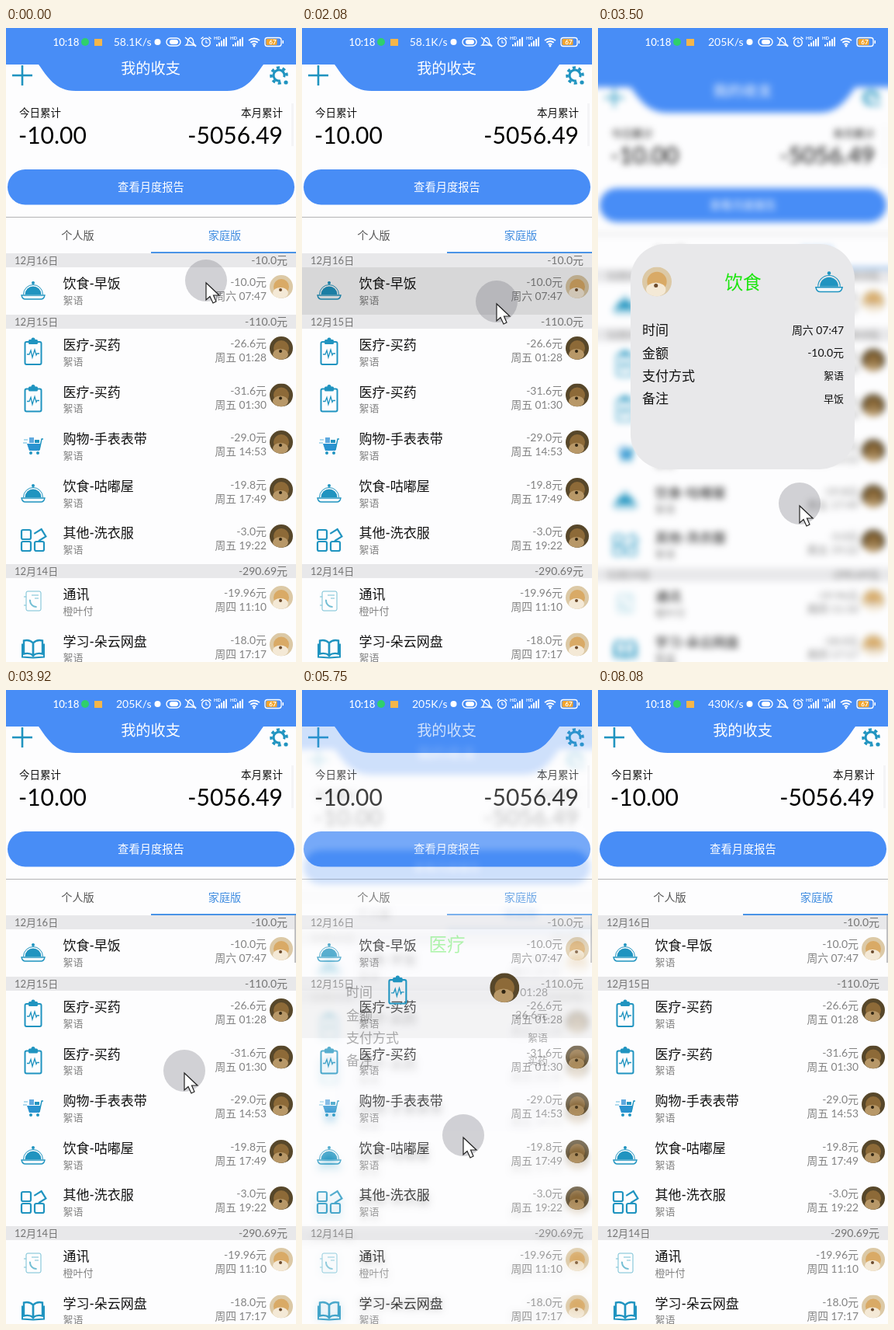
An HTML page with a canvas for the animation above (8160 ms loop, 374 by 816 pixels).

```html
<!DOCTYPE html>
<html lang="zh-CN">
<head>
<meta charset="utf-8">
<title>我的收支</title>
<style>
html, body { margin: 0; width: 100%; height: 100%; overflow: hidden; background: #fdfdfe; }
canvas { display: block; width: 374px; height: 816px; }
</style>
</head>
<body>
<canvas id="stage" width="374" height="816"></canvas>
<script>
const W = 374, H = 816, LOOP = 8160;
const BLUE = '#488df6', TEAL = '#2094c0', PAPER = '#fdfdfe';
const BAND = '#e8e8ea', INK = '#111', GRAY = '#828282';
const FONT = 'Lato, "Noto Sans CJK SC", "Noto Sans CJK", sans-serif';

const stage = document.getElementById('stage').getContext('2d');
let g = stage;

// Drawing helpers
function text(s, x, cy, size, color, align = 'left', weight = 400) {
  g.font = `${weight} ${size}px ${FONT}`;
  g.fillStyle = color;
  g.textAlign = align;
  g.textBaseline = 'alphabetic';
  g.fillText(s, x, cy + size * 0.37);
}
function rect(x, y, w, h, color) {
  g.fillStyle = color;
  g.fillRect(x, y, w, h);
}
function round(x, y, w, h, r, color) {
  g.beginPath();
  g.roundRect(x, y, w, h, r);
  g.fillStyle = color;
  g.fill();
}
function roundLine(x, y, w, h, r, color, lw) {
  g.beginPath();
  g.roundRect(x, y, w, h, r);
  g.strokeStyle = color;
  g.lineWidth = lw;
  g.stroke();
}
function disc(x, y, r, color) {
  g.beginPath();
  g.arc(x, y, r, 0, 7);
  g.fillStyle = color;
  g.fill();
}
function line(points, color, lw) {
  g.beginPath();
  points.forEach(([x, y]) => g.lineTo(x, y));
  g.strokeStyle = color;
  g.lineWidth = lw;
  g.stroke();
}
function arc(x, y, r, a, b, color, lw) {
  g.beginPath();
  g.arc(x, y, r, a, b);
  g.strokeStyle = color;
  g.lineWidth = lw;
  g.stroke();
}
function at(x, y, scale, draw) {
  g.save();
  g.translate(x, y);
  g.scale(scale, scale);
  draw();
  g.restore();
}

// Category icons, centred on the origin
const icons = {
  dish() {
    g.beginPath();
    g.arc(0, 5, 10.5, Math.PI, 0);
    g.closePath();
    g.fillStyle = TEAL;
    g.fill();
    arc(0, 5, 12.5, Math.PI, 0, TEAL, 1);
    disc(0, -10, 2, TEAL);
    g.beginPath();
    g.moveTo(-15, 6);
    g.lineTo(15, 6);
    g.quadraticCurveTo(14, 11, 10, 11);
    g.lineTo(-10, 11);
    g.quadraticCurveTo(-14, 11, -15, 6);
    g.closePath();
    g.fillStyle = '#f2f8fb';
    g.fill();
    g.strokeStyle = TEAL;
    g.lineWidth = 1.3;
    g.stroke();
  },
  clip() {
    roundLine(-10.5, -13, 21, 29, 2, TEAL, 2);
    round(-6, -16, 12, 6, 1.5, TEAL);
    disc(0, -16, 2.5, TEAL);
    line([[-8, 3], [-5, 3], [-3, -2], [-1, 7], [2, -3], [4, 4], [5, 2], [8, 2]], TEAL, 1.3);
  },
  cart() {
    line([[-12, -8], [-7, -8]], '#7cc4e4', 1.2);
    line([[-13, -4], [-8, -4]], '#7cc4e4', 1.2);
    rect(-5, -11, 6, 7, '#5fa9df');
    rect(2, -8, 6, 4, TEAL);
    g.beginPath();
    g.moveTo(-8, -3);
    g.lineTo(10, -3);
    g.lineTo(8, 6);
    g.lineTo(-5, 6);
    g.closePath();
    g.fillStyle = '#2a93d0';
    g.fill();
    line([[8, 5], [11, -9], [13, -9]], TEAL, 1.5);
    disc(-3, 9, 2, TEAL);
    disc(6, 9, 2, TEAL);
  },
  other() {
    for (const [x, y] of [[-15, -13], [-15, 2], [2, 2]]) roundLine(x, y, 12, 12, 2, TEAL, 2.2);
    at(9, -7, 1, () => {
      g.rotate(-0.55);
      line([[-6, -5], [5, -5], [5, 6], [-6, 6]], TEAL, 2.2);
    });
  },
  phone() {
    const c = '#74bfd4';
    roundLine(-9, -13, 19, 25, 2, c, 1);
    line([[-2, -8], [7, -8]], c, 1);
    line([[2, -4], [7, -4]], c, 1);
    arc(4, -1, 8, 1.5, 3.3, c, 2);
    line([[-12, -6], [-9, -6]], c, 1);
    line([[-12, 5], [-9, 5]], c, 1);
  },
  book() {
    for (const k of [-1, 1]) {
      g.beginPath();
      g.moveTo(0, -7);
      g.quadraticCurveTo(k * 5, -12, k * 12, -10);
      g.lineTo(k * 12, 7);
      g.quadraticCurveTo(k * 5, 5, 0, 9);
      g.closePath();
      g.strokeStyle = TEAL;
      g.lineWidth = 2.4;
      g.stroke();
      line([[k * 14, -6], [k * 14, 11], [0, 12]], TEAL, 2);
    }
  }
};

function avatar(x, y, r, dark) {
  const [back, coat, face, mark] = dark
    ? ['#57472a', '#8d6a38', '#b89868', '#302512']
    : ['#dcc9a6', '#d9aa66', '#f4e9d6', '#6b4a2c'];
  g.save();
  g.beginPath();
  g.arc(x, y, r, 0, 7);
  g.clip();
  at(x, y, r / 15, () => {
    rect(-15, -15, 30, 30, back);
    disc(0, 0, 10, coat);
    g.beginPath();
    g.ellipse(-1, 8, 10, 7, 0, 0, 7);
    g.fillStyle = face;
    g.fill();
    disc(-1, 4, 2, mark);
  });
  g.restore();
}

// Screen content
const bands = [
  [290, '12月16日', '-10.0元'],
  [369, '12月15日', '-110.0元'],
  [690, '12月14日', '-290.69元']
];
const rows = [
  [329, 'dish', '饮食-早饭', '絮语', '-10.0元', '周六 07:47', 0],
  [408, 'clip', '医疗-买药', '絮语', '-26.6元', '周五 01:28', 1],
  [468.5, 'clip', '医疗-买药', '絮语', '-31.6元', '周五 01:30', 1],
  [529, 'cart', '购物-手表表带', '絮语', '-29.0元', '周五 14:53', 1],
  [590, 'dish', '饮食-咕嘟屋', '絮语', '-19.8元', '周五 17:49', 1],
  [650, 'other', '其他-洗衣服', '絮语', '-3.0元', '周五 19:22', 1],
  [729, 'phone', '通讯', '橙叶付', '-19.96元', '周四 11:10', 0],
  [789.5, 'book', '学习-朵云网盘', '絮语', '-18.0元', '周四 17:17', 0]
];

function header() {
  g.beginPath();
  g.moveTo(0, 0);
  g.lineTo(W, 0);
  g.lineTo(W, 47);
  g.lineTo(332, 47);
  g.bezierCurveTo(321, 62, 311, 81, 285, 81);
  g.lineTo(90, 81);
  g.bezierCurveTo(63, 81, 53, 62, 42, 47);
  g.lineTo(0, 47);
  g.fillStyle = BLUE;
  g.fill();
  text('我的收支', 186.5, 52, 19.2, '#fff', 'center');
  line([[8, 61], [34, 61]], TEAL, 2.6);
  line([[21, 48], [21, 74]], TEAL, 2.6);
  arc(352, 61, 7, 1.3, 6.6, TEAL, 3);
  g.setLineDash([4, 3.7]);
  arc(352, 61, 10, 1.3, 6.6, TEAL, 3.5);
  g.setLineDash([]);
  disc(361, 70, 2.6, TEAL);
}

function screen(hidden) {
  rect(0, 0, W, H, PAPER);
  header();
  text('今日累计', 17, 109, 13.5, INK, 'left', 500);
  text('本月累计', 357, 109, 13.5, INK, 'right', 500);
  text('-10.00', 16, 138, 30, '#000');
  text('-5056.49', 357, 138, 30, '#000', 'right');
  rect(368, 97, 3, 55, '#f4f4f6');
  round(2, 182, 370, 45.5, 22.7, BLUE);
  text('查看月度报告', 187, 205, 14.3, '#fff', 'center', 500);
  rect(0, 243, W, 1, '#b4b4b4');
  text('个人版', 92.5, 266.5, 14.2, '#555', 'center');
  text('家庭版', 282, 266.5, 14.2, '#3f8ce0', 'center');
  rect(187, 288, 187, 2, '#4a94e6');
  for (const [y, day, sum] of bands) {
    rect(0, y, W, 18, BAND);
    text(day, 11, y + 9, 13, '#747474');
    text(sum, 363, y + 9, 14, '#747474', 'right');
  }
  rows.forEach(([y, icon, name, via, sum, when, dark], i) => {
    if (i !== hidden) {
      at(35, y + 9, 1, icons[icon]);
      avatar(355, y + 4, 15, dark);
    }
    text(name, 73.5, y, 17, INK, 'left', 500);
    text(via, 73.5, y + 21, 13, GRAY);
    text(sum, 336, y - 2, 14, GRAY, 'right');
    text(when, 336, y + 16, 13.8, GRAY, 'right');
  });
}

function statusBar(t) {
  const speed = t < 3170 ? '58.1K/s' : t < 7200 ? '205K/s' : '430K/s';
  const c = '#fff';
  text('10:18', 60.5, 18, 13.2, c, 'left', 500);
  disc(102, 18, 5, '#2fd06c');
  rect(114, 14, 10, 9, '#f5b64a');
  text(speed, 187.5, 18, 14, c, 'right');
  disc(195.5, 18, 4, c);
  roundLine(207, 13, 18, 10, 5, c, 1.4);
  round(211, 15, 11, 6, 3, c);
  g.beginPath();
  g.moveTo(232, 22);
  g.quadraticCurveTo(235, 20, 234.5, 16);
  g.quadraticCurveTo(238, 9, 241.5, 16);
  g.quadraticCurveTo(241, 20, 244, 22);
  g.closePath();
  g.strokeStyle = c;
  g.lineWidth = 1.3;
  g.stroke();
  line([[231, 12], [245, 24]], c, 1.3);
  arc(258, 18.5, 5.3, 0, 7, c, 1.4);
  line([[258, 15.5], [258, 19], [260.5, 19]], c, 1.2);
  line([[251.5, 14], [254.5, 11.5]], c, 1.4);
  line([[264.5, 14], [261.5, 11.5]], c, 1.4);
  for (const x of [268, 289]) {
    text('HD', x, 12.5, 6, c, 'left', 700);
    for (let i = 0; i < 5; i++) rect(x + 3 + i * 3, 21 - i * 2.3, 2, 2.5 + i * 2.3, c);
  }
  for (const r of [3.5, 7, 10.5]) arc(320, 24, r, -2.3, -0.84, c, 1.8);
  disc(320, 23, 1.5, c);
  roundLine(334, 12.5, 21, 11, 3, c, 1.3);
  round(335.5, 14, 14, 8, 1.5, '#f3a52c');
  rect(356.5, 16, 1.5, 4, c);
  text('67', 344, 18, 8, c, 'center', 700);
}

// Soft copy of the screen, fitted below the status bar
function softCopy() {
  const PAD = 20, TOP = 31;
  const make = (w, h) => {
    const c = document.createElement('canvas');
    c.width = w;
    c.height = h;
    g = c.getContext('2d');
    return c;
  };
  const sharp = make(W, H);
  screen(-1);
  const wide = make(W + PAD * 2, H + PAD);
  g.drawImage(sharp, 0, 0, 1, H, 0, 0, PAD, H);
  g.drawImage(sharp, W - 1, 0, 1, H, W + PAD, 0, PAD, H);
  g.drawImage(sharp, PAD, 0);
  g.drawImage(wide, 0, H - 1, W + PAD * 2, 1, 0, H, W + PAD * 2, PAD);
  const soft = make(W, H);
  const k = (H - TOP) / H;
  rect(0, 0, W, H, PAPER);
  g.filter = 'blur(4.5px)';
  g.drawImage(wide, -PAD, TOP, W + PAD * 2, (H + PAD) * k);
  g.filter = 'none';
  rect(0, 0, W, 50, BLUE);
  g = stage;
  return soft;
}
const soft = softCopy();

// Motion
const lerp = (a, b, k) => a + (b - a) * k;
const clamp = v => Math.max(0, Math.min(1, v));
const smooth = k => k * k * (3 - 2 * k);

// Standard curve: cubic-bezier(.4, 0, .2, 1)
function ease(x) {
  let lo = 0, hi = 1;
  for (let i = 0; i < 20; i++) {
    const u = (lo + hi) / 2, v = 1 - u;
    if (1.2 * u * v * v + 0.6 * u * u * v + u * u * u < x) lo = u;
    else hi = u;
  }
  return lo * lo * (3 - 2 * lo);
}

const OPEN_MS = 400, CLOSE_MS = 380, BAR_MS = 1300;
const visits = [
  { press: 1900, open: 2200, close: 3530, row: 0 },
  { press: 4260, open: 4480, close: 5588, row: 1 },
  { press: 6250, open: 6420, close: 7660, row: 1 }
];
const path = [
  [0, 258, 325], [80, 258, 325], [250, 236, 341], [1170, 236, 341], [2000, 251, 352],
  [2250, 251, 352], [2950, 260, 605], [3500, 260, 612], [3600, 260, 612], [3920, 230, 490],
  [4250, 226, 416], [4500, 226, 416], [5150, 210, 568], [5760, 208, 573],
  [6200, 236, 416], [6420, 236, 416], [6830, 245, 634], [LOOP, 245, 634]
];

function pointer(t) {
  if (t > 7950) return;
  const i = path.findIndex(p => p[0] > t);
  const [t0, x0, y0] = path[i - 1], [t1, x1, y1] = path[i];
  const k = smooth((t - t0) / (t1 - t0));
  const x = lerp(x0, x1, k), y = lerp(y0, y1, k);
  disc(x, y, 27, 'rgba(115,115,125,.32)');
  at(x, y + 3, 1, () => {
    g.beginPath();
    [[0, 0], [0, 22], [5, 17.5], [9, 26], [13, 24], [9.5, 16], [17, 16]].forEach(p => g.lineTo(...p));
    g.closePath();
    g.fillStyle = '#fff';
    g.fill();
    g.strokeStyle = '#222';
    g.lineWidth = 1.2;
    g.stroke();
  });
}

function card(row, p) {
  const [y, icon, name, via, sum, when, dark] = rows[row];
  const [kind, note] = name.split('-');
  g.globalAlpha = p ** 1.25;
  g.drawImage(soft, 0, 0);
  g.globalAlpha = p ** 3;
  round(42, 278, 289, 290, 45, BAND);
  g.globalAlpha = p;
  text(kind, 187, 327, 23.5, '#1ce60f', 'center');
  [['时间', when, 13.9], ['金额', sum, 14], ['支付方式', via, 13], ['备注', note, 13]].forEach(([label, value, size], i) => {
    const cy = 389 + i * 29.3;
    text(label, 57, cy, 17, INK, 'left', 500);
    text(value, 317, cy, size, INK, 'right');
  });
  g.globalAlpha = 1;
  at(lerp(35, 298, p), lerp(y + 9, 327, p), lerp(1, 1.14, p), icons[icon]);
  avatar(lerp(355, 76, p), lerp(y + 4, 326.5, p), 15 + 4 * clamp(p * 3), dark);
}

function frame(now) {
  const t = now % LOOP;
  const v = visits.find(o => t >= o.press && t < o.close + CLOSE_MS);
  let p = 0;
  if (v) {
    p = t < v.close
      ? ease(clamp((t - v.open) / OPEN_MS))
      : 1 - ease(clamp((t - v.close) / CLOSE_MS));
  }
  screen(p > 0 ? v.row : -1);
  if (v) {
    // The pressed row stays lit until the card has gone
    g.globalAlpha = t < v.close ? clamp((t - v.press) / 120) : p;
    rect(0, v.row ? 387 : 308, W, 61, 'rgba(0,0,0,.15)');
    g.globalAlpha = 1;
  }
  if (visits.some(o => t > o.close && t < o.close + BAR_MS)) rect(372, 290, 2, 61, '#c0c0c2');
  if (p > 0) card(v.row, p);
  statusBar(t);
  pointer(t);
}

let start;
function tick(now) {
  start ??= now;
  frame(now - start);
  requestAnimationFrame(tick);
}
frame(0);
requestAnimationFrame(tick);
</script>
</body>
</html>
```
